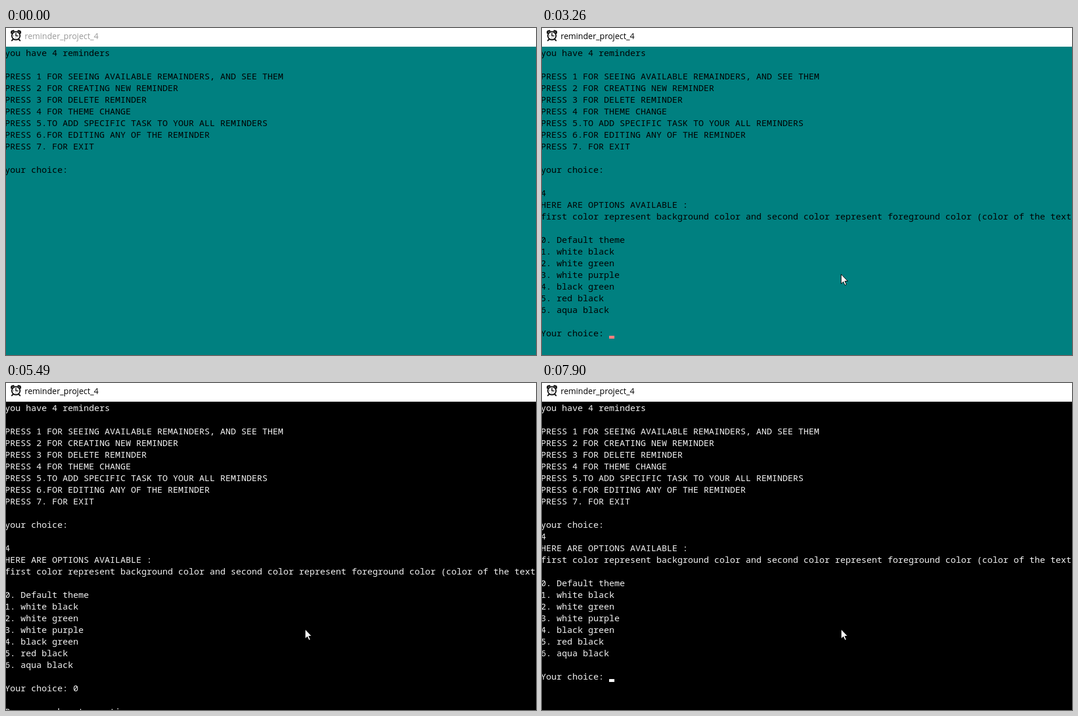
Recreate the animation shown at these times as an HTML page. Size 908x560 px, loop 8 s.

```html
<!DOCTYPE html>
<html lang="en">
<head>
<meta charset="utf-8">
<title>Reminder console</title>
<style>
  html, body { margin: 0; width: 100%; height: 100%; overflow: hidden; }
  #stage { position: relative; width: 908px; height: 560px; overflow: hidden; background: #008080; color: #000; }
  #stage.dark { background: #000; color: #f2f2f2; }
  #bar { position: absolute; left: 0; top: 0; width: 908px; height: 32px; background: #fff; }
  #console { position: absolute; left: -2px; top: 32px; margin: 0; font: 15px/20px "Noto Sans Mono", monospace; }
  #caret { position: absolute; width: 9px; height: 5px; background: #ff7f7f; }
  .dark #caret { background: #fff; }
  svg { position: absolute; left: 0; top: 0; }
  #title { font: 14px "Open Sans", sans-serif; }
</style>
</head>
<body>
<div id="stage">
  <div id="bar"></div>
  <pre id="console"></pre>
  <div id="caret"></div>
  <svg width="908" height="560">
    <g stroke="#111" fill="none" stroke-linecap="round">
      <path d="M9.5 8.5 Q8.5 5 13 4.8 M24.5 8.5 Q25.5 5 21 4.8" stroke-width="2.8"/>
      <path d="M12 19.5 L10 21.5 M22 19.5 L24 21.5" stroke-width="2.2"/>
      <circle cx="17" cy="13.2" r="7" fill="#fff" stroke-width="2.1"/>
      <path d="M17 9 V13.5 H20.5" stroke-width="1.6"/>
      <path d="M13 13.3 H13.2 M17 17.2 V17.3" stroke-width="1.2"/>
    </g>
    <text id="title" x="32" y="19">reminder_project_4</text>
    <path id="pointer" d="M.5 .8 V17 L4.2 13.5 L7 19.5 L9.5 18.4 L6.8 12.5 H11.8 Z" fill="#fff" stroke="#000"/>
    <circle id="click" cx="512" cy="421" r="15" fill="#ff0" fill-opacity=".47"/>
  </svg>
</div>
<script>
const LOOP = 8000;
const $ = id => document.getElementById(id);

const menu = `you have 4 reminders

PRESS 1 FOR SEEING AVAILABLE REMAINDERS, AND SEE THEM
PRESS 2 FOR CREATING NEW REMINDER
PRESS 3 FOR DELETE REMINDER
PRESS 4 FOR THEME CHANGE
PRESS 5.TO ADD SPECIFIC TASK TO YOUR ALL REMINDERS
PRESS 6.FOR EDITING ANY OF THE REMINDER
PRESS 7. FOR EXIT

your choice:
`;
const themes = `4
HERE ARE OPTIONS AVAILABLE :
first color represent background color and second color represent foreground color (color of the text

0. Default theme
1. white black
2. white green
3. white purple
4. black green
5. red black
6. aqua black

Your choice: `;
const spaced = menu + "\n";
const picking = spaced + themes;

// [start time, console text, caret shown]; the caret always follows the text
const states = [
  [0, spaced, false],
  [1490, spaced, true],
  [2050, spaced, false],
  [2560, spaced, true],
  [3080, spaced, false],
  [3130, spaced + "4", true],
  [3260, picking, true],
  [4130, picking, false],
  [4670, picking, true],
  [5200, picking, false],
  [5270, picking + "0", true],
  [5430, picking + "0\n", true],
  [5490, picking + "0\n\nPress any key to continue . . . ", true],
  [6100, menu, true],
  [6770, menu, false],
  [7280, menu, true],
  [7770, menu + "4", true],
  [7900, menu + themes, true]
];

const show = (id, on) => { $(id).style.display = on ? "" : "none"; };

function placePointer(t) {
  const step = Math.min(5, Math.max(0, Math.floor((t - 480) / 30)));
  const left = (1 - step / 5) ** 2;
  const x = Math.round(512 + 185 * left), y = Math.round(421 + 105 * left);
  $("pointer").setAttribute("transform", `translate(${x} ${y})`);
  show("pointer", t >= 480);
  show("click", t >= 970 && t < 1220);
}

let current;
function render(t) {
  const state = states.findLast(s => s[0] <= t);
  if (state !== current) {
    current = state;
    const [, text, caretOn] = state;
    const lines = text.split("\n");
    $("console").textContent = text;
    $("caret").style.left = lines.at(-1).length * 9 - 2 + "px";
    $("caret").style.top = lines.length * 20 + 27 + "px";
    show("caret", caretOn);
  }
  $("stage").className = t >= 5490 ? "dark" : "";
  $("title").setAttribute("fill", t < 970 ? "#999" : "#000");
  placePointer(t);
}

const start = performance.now();
function tick() {
  render((performance.now() - start) % LOOP);
  requestAnimationFrame(tick);
}
tick();
</script>
</body>
</html>
```
